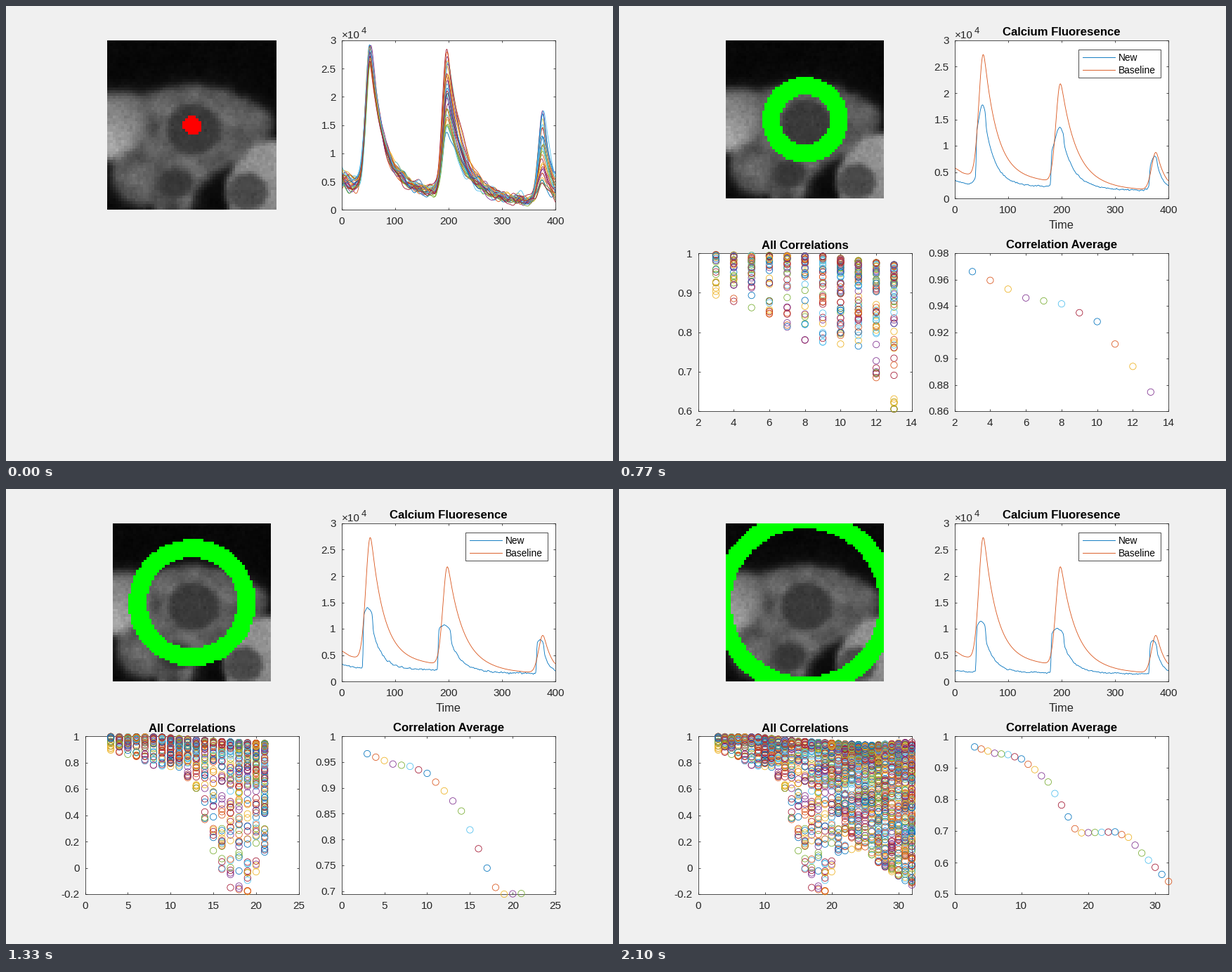
Write a matplotlib script that moves like this. It is 864x648 px and loops after 2170 ms.

```python
import numpy as np
import matplotlib.pyplot as plt
from matplotlib.animation import FuncAnimation
from matplotlib.patches import Circle, Polygon, Rectangle
from matplotlib.path import Path

W, H, STEPS, SIDE = 864, 648, 31, 61
INK, BG, ICON = "#262626", "#f0f0f0", "#8a8a8a"
CYCLE = ["#0072bd", "#d95319", "#edb120", "#7e2f8e", "#77ac30", "#4dbeee", "#a2142f"]
plt.rcParams["font.family"] = "Liberation Sans"
plt.rcParams["axes.linewidth"] = 0.8

fig = plt.figure(figsize=(W / 72, H / 72), dpi=72, facecolor=BG)


def smooth(y, sigma):
    r = int(4 * sigma) + 1
    g = np.exp(-0.5 * (np.arange(-r, r + 1) / sigma) ** 2)
    return np.convolve(np.pad(y, r, mode="edge"), g / g.sum(), "valid")


def blur(a, sigma):
    for axis in (0, 1):
        a = np.apply_along_axis(smooth, axis, a, sigma)
    return a


# ---- microscope picture -------------------------------------------------
gy, gx = np.mgrid[0:SIDE, 0:SIDE].astype(float)


def region(points, sigma):
    pix = np.column_stack([gx.ravel(), gy.ravel()])
    mask = Path(points).contains_points(pix, radius=0.01)
    return blur(mask.reshape(SIDE, SIDE).astype(float), sigma)


def spot(cx, cy, rx, ry, soft):
    d = np.hypot((gx - cx) / rx, (gy - cy) / ry)
    return 1 / (1 + np.exp((d - 1) / soft))


def tissue():
    rng = np.random.default_rng(4)
    body = [(-9, 21), (14, 19), (22, 16.5), (30, 15.5), (42, 17.5), (50, 21), (58, 26),
            (59, 31), (57, 37), (46, 43), (40, 46), (35, 50), (31, 55), (29, 70),
            (16, 70), (12, 59), (6, 57), (2, 52), (2, 42), (-9, 42)]
    left = [(-9, 19), (8, 18.5), (13, 22), (13, 30), (9, 36), (4, 41), (-9, 41)]
    right = [(43, 49), (47, 42), (52, 37.5), (58, 36), (70, 36), (70, 70), (47, 70), (43, 57)]
    img = 7 + 30 * region(body, 4.5) + 60 * region(body, 1.4)
    img *= 1 + 0.6 * blur(rng.normal(size=(SIDE, SIDE)), 1.8)

    def mix(mask, level):
        return img + mask * (level - img)

    img = mix(region(left, 1.8), 115 + 3 * (gy - 18) - 2 * gx)
    img = mix(spot(30.6, 31.6, 9.8, 9.4, 0.06), 58)
    img = mix(spot(24, 51, 6.3, 5.3, 0.12), 55)
    img = mix(region(right, 1.2), 152 - 0.8 * (gy - 36))
    img = mix(spot(50, 54, 7.2, 6.8, 0.08), 72)
    grain = 0.7 * blur(rng.normal(size=(SIDE, SIDE)), 0.5) + 0.3 * rng.normal(size=(SIDE, SIDE))
    return np.clip(img + grain * (2 + 0.055 * img), 0, 255)


GRAY = tissue()
DIST = np.hypot(gx - 30.15, gy - 30.15)


def picture(n):
    rgb = np.repeat(GRAY[..., None], 3, axis=2).astype(np.uint8)
    if n == 0:
        rgb[DIST < 3.5] = (255, 0, 0)
    else:
        rgb[(DIST < n + 5.5) & (DIST >= max(n - 1.5, 0))] = (0, 255, 0)
    return rgb


# ---- fluorescence traces ------------------------------------------------
t = np.arange(401)
# Each beat: peak time, decay, start and stop of its clipped form.
BEATS = [(54, 24, 41, 58), (198, 28, 181, 204), (377, 16, 365, 378)]
BEAT_HEIGHTS = np.array([27.3, 21.7, 8.7]) * 1000
FLOOR = smooth(np.interp(t, [0, 15, 33, 165, 310, 400], [5900, 4800, 4400, 3300, 1900, 1350]), 4)


def pulse(at, tau):
    d = t - at
    y = smooth(np.where(d < 0, np.exp(-0.5 * (d / 8) ** 2), np.exp(-np.maximum(d, 0) / tau)), 2.5)
    return y / y.max()


def plateau(start, stop, tau):
    u = np.clip((t - start) / (stop - start), 0, 1)
    after = 0.65 * np.exp(-np.maximum(t - stop, 0) / tau)
    y = np.where(t < start, 0, np.where(t <= stop, 0.88 + 0.12 * np.sin(np.pi * u), after))
    return smooth(y, 0.8)


def trace(heights, floor=FLOOR, clipped=0.0, decay=1.0):
    y = floor.copy()
    for h, (at, tau, start, stop) in zip(heights, BEATS):
        shape = (1 - clipped) * pulse(at, tau * decay) + clipped * plateau(start, stop, tau * 0.72)
        y += (h - floor[at]) * shape
    return y


def new_trace(n):
    def key(*values):
        return np.interp(n, [0, 4, 13, 19, 30], values)

    heights = 1000 * np.array([key(27.3, 20, 17.3, 13.9, 11.4),
                               key(21.7, 15.3, 13.2, 10.7, 10),
                               key(8.7, 8.7, 8, 7.9, 7.8)])
    floor = 1400 + key(1, .62, .4, .42, .14) * (FLOOR - 1400)
    noise = smooth(np.random.default_rng(n).normal(size=t.size), 0.8)
    y = trace(heights, floor, np.clip((n - 8) / 5, 0, 1), 1 - 0.15 * min(n / 4, 1))
    return y + noise * np.interp(n, [4, 8, 13, 30], [0, 30, 150, 110])


def cell_traces(count=28):
    rng = np.random.default_rng(11)
    second = rng.permutation(np.linspace(0.64, 1.3, count))
    third = rng.permutation(np.linspace(0.72, 1.43, count) ** 2)
    for a2, a3 in zip(second, third):
        gains = rng.uniform(0.95, 1.06), a2, a3
        y = trace(BEAT_HEIGHTS * gains, FLOOR * rng.uniform(0.8, 1.2))
        y = np.interp(t - rng.normal(0, 0.9), t, y)
        y += 1500 * smooth(rng.normal(size=t.size), 4)
        yield np.maximum(y, 300)


BASE = trace(BEAT_HEIGHTS)
TRACES = list(cell_traces())

# ---- correlations -------------------------------------------------------
K = np.arange(3, STEPS + 2)
MEAN = np.interp(K, [3, 6, 8, 10, 12, 14, 16, 18, 19, 24, 26, 28, 32],
                 [.966, .946, .9415, .928, .894, .855, .782, .707, .694, .697, .68, .63, .54])
LOW = np.interp(K, [3, 6, 8, 11, 13, 15, 17, 19, 21, 25, 27, 32],
                [.894, .846, .78, .765, .605, .13, -.15, -.18, .12, .16, .04, -.13])
TOP = np.interp(K, [3, 9, 15, 26, 32], [.996, .992, .96, .93, .955])


def column(k, mean, low, top):
    rng = np.random.default_rng(100 + k)
    u = rng.random(int(12 + 4.5 * k))
    u[:2] = 0, 1
    power = (top - low) / (top - mean) - 1
    return top - (top - low) * u ** power, rng.integers(0, 7, u.size)


COLUMNS = [column(*row) for row in zip(K, MEAN, LOW, TOP)]


def auto_limits(values, most):
    """Round limits outwards to a tick, unless that wastes too much room."""
    lo, hi = min(values), max(values)
    if lo == hi:
        lo, hi = lo - 1, hi + 1
    span = hi - lo
    unit = 10.0 ** np.floor(np.log10(span / most))
    step = next(m * unit for m in (1, 2, 5, 10) if span / (m * unit) <= most + 1e-9)
    up = np.ceil(hi / step - 1e-9) * step
    down = np.floor(lo / step + 1e-9) * step
    if up - hi < 0.26 * span:
        hi = up
    if lo - down < 0.26 * span and (hi - down) / step < 6.5:
        lo = down
    return lo, hi, step


# ---- drawing ------------------------------------------------------------
def axes(left, top, right, bottom):
    return fig.add_axes([left / W, 1 - bottom / H, (right - left) / W, (bottom - top) / H])


def ticks(lo, hi, step, scale=1):
    at = np.arange(np.ceil(lo / step - 1e-6), np.floor(hi / step + 1e-6) + 1) * step
    return at, [f"{round(v / scale, 6) + 0:g}" for v in at]


def chart(rect, xl, yl, scale=1):
    ax = axes(*rect)
    ax.tick_params(direction="in", top=True, right=True, length=3, width=0.8,
                   color=INK, labelcolor=INK, labelsize=15.3)
    ax.tick_params(axis="x", pad=10)
    ax.tick_params(axis="y", pad=8)
    for s in ax.spines.values():
        s.set_color(INK)
    ax.set_xticks(*ticks(*xl))
    ax.set_yticks(*ticks(*yl, scale))
    ax.set_xlim(xl[:2])
    ax.set_ylim(yl[:2])
    return ax


def rings(ax, x, y, colors):
    ax.scatter(x, y, s=9.3 ** 2, facecolors="none", edgecolors=[CYCLE[c % 7] for c in colors],
               linewidths=0.8, clip_on=False, zorder=3)


def toolbar(top):
    def line(pts, lw=1.8):
        top.plot(*zip(*pts), color=ICON, lw=lw, solid_joinstyle="round")

    def solid(*pts):
        top.add_patch(Polygon(pts, fc=ICON, ec="none"))

    top.add_patch(Rectangle((567, 321), 216, 29, fc=BG, ec="none"))
    # export
    line([(574, 334), (570, 334), (570, 344), (588, 344), (588, 340)])
    line([(575, 339), (577, 333), (582, 330), (590, 330)])
    line([(585, 325), (590, 330), (585, 335)])
    solid((586, 341), (594, 341), (594, 346))
    # brush
    line([(614, 324), (613, 334)], 4)
    line([(621, 323), (618, 335), (609, 335), (611, 333)])
    solid((609, 337), (621, 337), (623, 347), (603, 347))
    # data tips
    line([(634, 323), (655, 323), (655, 347), (634, 347), (634, 338), (631, 335), (634, 332), (634, 323)])
    for y in (330, 335, 340):
        line([(639, y), (651, y)], 1.5)
    # hand
    for i, y in enumerate((326, 324, 326, 330)):
        line([(669 + 5 * i, y), (669 + 4.6 * i, 337)], 3.2)
    line([(663, 335), (668, 342), (671, 346), (680, 346), (684, 338), (684, 331)])
    # zooms
    for x in (703, 734):
        top.add_patch(Circle((x, 333), 8.7, fc="none", ec=ICON, lw=1.9))
        line([(x + 6.5, 339.5), (x + 14, 347)], 2.8)
        line([(x - 4.5, 333), (x + 4.5, 333)])
    line([(703, 328.5), (703, 337.5)])
    # home
    line([(755, 336), (767, 324.5), (779, 336)])
    line([(758, 335), (758, 347), (764, 347), (764, 339), (770, 339), (770, 347), (776, 347), (776, 335)])


def correlation_charts(n):
    ks, means = K[:n], MEAN[:n]
    vals, cols = zip(*COLUMNS[:n])
    x = np.repeat(ks, [v.size for v in vals])
    y = np.concatenate(vals)
    xl = auto_limits(ks, 5)
    full = chart((112.6, 352, 416.8, 577), xl, auto_limits(y, 6))
    avg = chart((477.6, 352, 782.2, 577), xl, auto_limits(means, 6))
    rings(full, x, y, np.concatenate(cols))
    rings(avg, ks, means, ks - 3)


def labels(top):
    bold = dict(size=16.8, weight="bold", ha="center", color="black")
    top.text(630, 42, "Calcium Fluoresence", **bold)
    top.text(264.5, 345.5, "All Correlations", **bold)
    top.text(630, 345.5, "Correlation Average", **bold)
    top.text(630, 317, "Time", size=16.4, ha="center", color=INK)
    top.add_patch(Rectangle((653.5, 61.5), 117, 40.5, fc="white", ec=INK, lw=0.8))
    for y, name, col in ((73, "New", CYCLE[0]), (91, "Baseline", CYCLE[1])):
        top.plot([660, 705.5], [y, y], color=col, lw=0.9)
        top.text(710.5, y + 5, name, size=13.7, color="black")


def draw(n):
    fig.clear()
    first = n == 0
    pic = axes(144, 49, 385, 290) if first else axes(152, 49, 377, 274)
    pic.imshow(picture(n), interpolation="nearest", aspect="auto")
    pic.axis("off")

    cal = chart((477.6, 49, 782.2, 290.5 if first else 274),
                (0, 400, 100), (0, 30000, 5000), 10000)
    for i, y in enumerate(TRACES if first else [new_trace(n), BASE]):
        cal.plot(t, y, color=CYCLE[i % 7], lw=0.85)

    top = fig.add_axes([0, 0, 1, 1], zorder=5)
    top.axis("off")
    top.set(xlim=(0, W), ylim=(H, 0))
    top.text(478, 46, "×10", size=15.3, color=INK)
    top.text(505.5, 39, "4", size=13, color=INK)
    if not first:
        correlation_charts(n)
        labels(top)
        if n <= 8:
            toolbar(top)


anim = FuncAnimation(fig, draw, frames=STEPS, interval=70, init_func=lambda: None,
                     repeat=True, repeat_delay=0)
plt.show()
```
